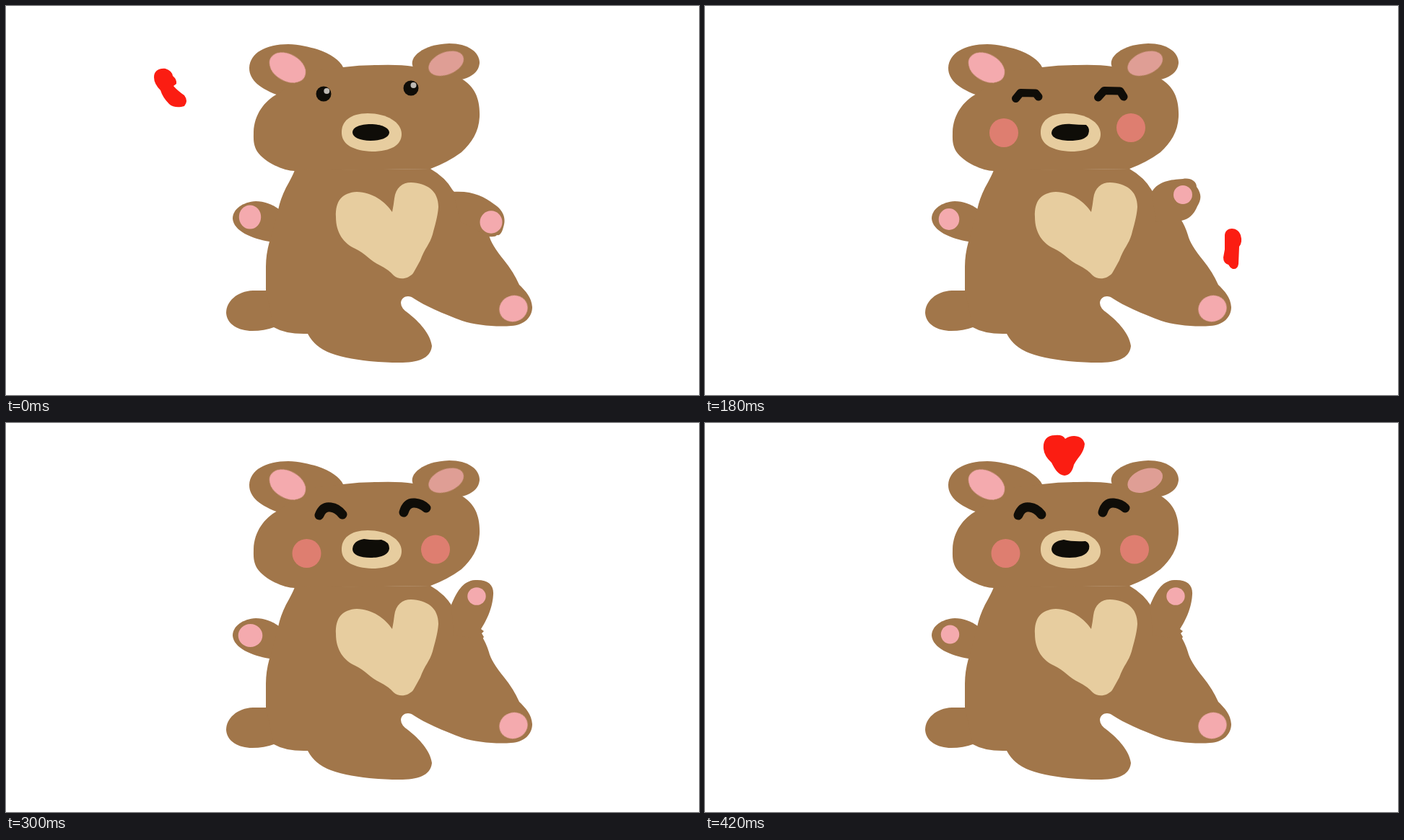
These frames come from a looping animation (960 px wide and 540 px high, 0.48 s). An HTML page:

```html
<!DOCTYPE html>
<html lang="en">
<head>
<meta charset="utf-8">
<title>Waving bear</title>
<style>
  html, body { margin: 0; width: 100%; height: 100%; overflow: hidden; background: #fff; }
  svg { display: block; width: 960px; height: 540px; }
  .soft { filter: blur(.6px); }
  .brown { fill: #a1764a; }
  .pink { fill: #f4aaae; }
  .cream { fill: #e7cd9f; }
  .ink { fill: #0f0d08; }
  .cheek { fill: #de7e70; }
  .line { fill: none; stroke: #0f0d08; stroke-linecap: round; stroke-linejoin: round; }
</style>
</head>
<body>
<svg viewBox="0 0 960 540">
  <g class="soft brown">
    <!-- ears, head -->
    <path d="M380 125C352 115 337 103 337 86C338 65 360 53 391 53C406 53 420 57 431 60C450 66 463 76 467 85L480 110Z"/>
    <path d="M564 85C557 71 578 53 614 52C640 52 656 64 656 79C655 92 644 99 631 102Z"/>
    <path d="M467 85Q490 82 515 82Q545 81 564 84L631 101C650 112 657 130 656 154C655 175 645 190 631 203Q612 217 588 226L400 229C385 229 358 217 348 202C342 192 343 183 343 175C344 150 358 132 376 122L420 90Z"/>
    <!-- left arm, tail -->
    <path d="M378 282C368 275 358 271 346 271C328 272 314 282 314 295C315 312 340 323 365 327L400 310Z"/>
    <path d="M361 395H342C320 396 305 410 305 426C306 442 322 451 341 451Q358 451 371 446L400 420Z"/>
    <!-- body, legs -->
    <path d="M400 228Q397 236 388 252Q380 268 377 283L365 327Q360 345 360 362V395L371 446Q388 456 418 455Q428 474 450 482C475 491 510 495 545 495C570 495 588 490 590 472C588 455 572 438 558 427Q547 420 547 412C548 402 559 401 565 406C580 416 605 427 632 437C650 443 680 446 700 444C718 443 729 432 729 418C728 404 720 396 711 387Q703 369 690 353Q672 331 669 318Q665 305 659 296L619 256Q609 238 588 226Z"/>
    <path id="arm"/>
  </g>
  <g class="soft">
    <ellipse class="pink" rx="27" ry="18.6" transform="translate(390 85.5) rotate(30)"/>
    <ellipse fill="#df9e95" rx="25.5" ry="15.5" transform="translate(609.7 79.7) rotate(-22)"/>
    <ellipse class="pink" rx="19.8" ry="18" transform="translate(703 420) rotate(-20)"/>
    <path class="cream" d="M465 177C464 160 477 149 501 149C527 149 548 161 548 178C548 193 533 202 507 202C482 201 466 193 465 177Z"/>
    <path class="cream" d="M457 293C456 270 466 259 486 258C507 258 526 272 535 286Q537 276 538 267C540 252 549 245 561 245C583 246 599 256 599 279C598 293 594 305 591 317C587 331 580 336 574 353Q568 364 564 371C557 379 545 381 537 374Q530 366 518 360C505 354 497 343 484 337C468 330 457 315 457 293Z"/>
    <ellipse id="padL" class="pink"/>
    <ellipse id="padR" class="pink"/>
    <path id="nose" class="ink"/>
    <g id="open">
      <circle class="ink" cx="440" cy="122" r="10.5"/>
      <circle class="ink" cx="561" cy="114" r="10.5"/>
      <circle fill="#bdb9b3" cx="444.3" cy="118" r="4"/>
      <circle fill="#bdb9b3" cx="564.5" cy="110" r="4"/>
    </g>
    <path id="eyes" class="line"/>
    <circle id="cheekL" class="cheek"/>
    <circle id="cheekR" class="cheek"/>
    <path id="mark" fill="#fb1d12" stroke="#fb1d12" stroke-linecap="round" stroke-linejoin="round"/>
  </g>
</svg>
<script>
const set = (id, attrs) => {
  const node = document.getElementById(id);
  for (const key in attrs) node.setAttribute(key, attrs[key]);
};
const oval = ([cx, cy, rx, ry]) => ({ cx, cy, rx, ry });
const dot = ([cx, cy]) => ({ cx, cy, r: 20 });
const hidden = { r: 0 };

const raised = {
  arm: "M617 252C624 236 632 219 650 218C668 217 676 225 675 238C674 258 665 275 658 286L662 289L659 292L662 297L660 300L620 295Z",
  padR: [652, 240.5, 12.7, 12.3]
};
const smile = {
  eyes: "M434 128Q439 115 450 117Q459 118 466 127M551 124Q555 110 566 111Q576 112 582 118",
  width: 13,
  cheeks: [[416.5, 181], [595, 175.5]]
};

const poses = [
  {
    arm: "M619 258C645 256 662 264 676 275C690 284 693 296 689 307C687 315 684 319 680 318Q678 321 669 320L630 300Z",
    padL: [338, 293, 15.2, 16.5], padR: [672, 300, 15.5, 15.7],
    nose: "M480 175.5C480 168 491 164 505 164C520 164 531 169 531 176C530 183 519 187 505 187C490 187 480 182 480 175.5Z",
    mark: "M205 99C205 90 212 86 221 87Q230 90 231 97Q237 102 236 108L232 111Q237 117 247 124Q253 132 247 139C240 141 231 141 226 136Q217 127 214 117Q205 108 205 99Z"
  },
  {
    arm: "M620 257L624 260C636 255 652 252 665 256C682 256 687 272 686 284C685 298 677 303 665 309L670 320L630 310Z",
    padL: [337, 294, 18, 13.3], padR: [665.5, 278, 12.7, 14],
    nose: "M480 175C481 164 500 159 519 160Q530 166 531 174C529 184 515 187 504 187C491 187 480 183 480 175Z",
    eyes: "M438.5 123H454M553 120H573", width: 15,
    mark: "M675 147C674 137 679 128 690 128C696 120 712 119 719 128C722 140 718 153 715 162Q717 176 710 180Q702 180 697 172Q688 163 683 156Q676 153 675 147Z"
  },
  {
    arm: "M619 258C628 243 645 241 662 240C672 238 681 243 681 251C689 262 687 270 682 278C677 290 670 296 660 298L625 300Z",
    padL: [338, 296, 14.3, 15], padR: [662, 262, 13, 13],
    nose: "M480 176C481 167 494 163 507 164Q518 165 528 165Q534 170 531 178C528 185 517 187 505 187C491 187 480 183 480 176Z",
    eyes: "M430.5 128.5L437 120.5L458 121L462 126M544.5 127L553 117.5L575 118L580 126", width: 11,
    cheeks: [[414, 176], [590, 169]],
    mark: "M720 318C721 306 738 306 742 318Q745 328 740 334L739 358Q738 366 731 365Q727 363 725 359Q718 357 718 349L720 338Z"
  },
  {
    ...smile,
    arm: "M618 255C622 240 636 226 652 226C660 225 666 228 671 233C681 236 683 248 680 257C676 270 667 280 659 297L625 295Z",
    padL: [337.5, 295, 16.3, 16.2], padR: [651, 254, 10.6, 12],
    nose: "M480 175C480 167 492 161 507 161C521 161 531 167 531 174C531 183 518 187 505 187C490 187 480 182 480 175Z",
    mark: "M717 359Q723 351 727 344Q738 329 743 325C754 320 764 328 764 337C762 350 752 354 744 358Q736 368 726 370C718 370 715 366 717 359Z"
  },
  {
    ...smile, ...raised,
    padL: [338.5, 295, 16.8, 16],
    nose: "M480 175Q481 163 496 161Q508 163 520 162Q531 165 531 174C530 184 517 187 505 187C490 187 480 183 480 175Z"
  },
  {
    ...smile, ...raised,
    padL: [337.8, 295, 13, 13],
    nose: "M480 176C481 167 494 163 508 164Q520 162 529 166Q532 172 530 178C526 185 517 187 505 187C491 187 480 183 480 176Z",
    mark: "M475 30Q487 29 492 44L499 64L515 26", markWidth: 14.5
  },
  {
    ...smile, ...raised,
    padL: [339.5, 293.5, 12.7, 13],
    nose: "M480 175Q481 164 497 162Q509 165 527 164Q534 167 532 175C529 184 517 187 505 187C490 187 480 183 480 175Z",
    mark: "M469 36C468 26 472 17 485 17Q496 16 499 22C508 15 524 17 526 29C525 42 516 48 511 58Q508 72 498 73C489 72 484 63 480 55Q470 46 469 36Z"
  }
];

function show(pose) {
  const { arm, padL, padR, nose, eyes, width, cheeks, mark = "", markWidth } = pose;
  set("arm", { d: arm });
  set("padL", oval(padL));
  set("padR", oval(padR));
  set("nose", { d: nose });
  set("open", { visibility: eyes ? "hidden" : "visible" });
  set("eyes", { d: eyes || "", "stroke-width": width || 0 });
  set("cheekL", cheeks ? dot(cheeks[0]) : hidden);
  set("cheekR", cheeks ? dot(cheeks[1]) : hidden);
  set("mark", { d: mark, "stroke-width": markWidth || 0, "fill-opacity": markWidth ? 0 : 1 });
}

// The first pose holds for two 60 ms steps, the others for one.
const start = performance.now();
function tick(now) {
  const step = Math.floor(Math.max(0, now - start) % 480 / 60);
  show(poses[Math.max(0, step - 1)]);
  requestAnimationFrame(tick);
}
tick(start);
</script>
</body>
</html>
```
